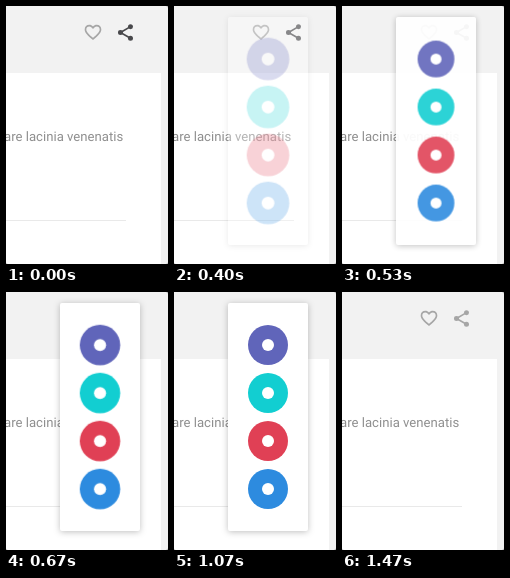
Write an HTML page that moves like this. It is 162 by 258 pixels and loops after 2.27 s.

```html
<!DOCTYPE html>
<html lang="en">
<head>
<meta charset="utf-8">
<title>Share menu</title>
<style>
  html, body { margin: 0; width: 100%; height: 100%; overflow: hidden; background: #a5a5a5; }
  svg { display: block; width: 100vw; height: 100vh; }
  text {
    font: 13.15px Roboto, sans-serif;
    fill: #8f8f8f;
    text-anchor: end;
    text-rendering: geometricPrecision;
  }

  .heart { fill: #a6a6a6; }
  .share { animation: press 2270ms step-end infinite; }
  .panel {
    fill: #fff;
    filter: drop-shadow(0 1px 3px rgba(0, 0, 0, .25));
    animation: panel 2270ms linear infinite;
  }
  .buttons { animation: buttons 2270ms linear infinite; }
  .button {
    transform-box: fill-box;
    transform-origin: center;
    animation: bounce 2270ms cubic-bezier(.215, .61, .355, 1) infinite;
  }
  .mark { fill: #fff; }

  @keyframes press {
    0% { fill: #48484b; }
    64.757%, 100% { fill: #a6a6a6; }
  }
  @keyframes panel {
    0% { opacity: 0; }
    12.335% { opacity: 0; animation-timing-function: ease-in-out; }
    25.33%, 64.75% { opacity: 1; }
    64.757%, 100% { opacity: 0; }
  }
  @keyframes buttons {
    0% { opacity: 0; }
    13.216% { opacity: 0; animation-timing-function: ease-in-out; }
    26.43%, 64.75% { opacity: 1; }
    64.757%, 100% { opacity: 0; }
  }
  @keyframes bounce {
    0%, 13.216% { transform: scale(.3); }
    19.824% { transform: scale(1.1); }
    26.43% { transform: scale(.9); }
    33.04% { transform: scale(1.03); }
    39.65% { transform: scale(.97); }
    46.26%, 100% { transform: scale(1); }
  }
</style>
</head>
<body>
<svg viewBox="0 0 162 258">
  <path fill="#f2f2f2" d="M0 0H159.5Q162 0 162 2.5V255.5Q162 258 159.5 258H2.5Q0 258 0 255.5Z"/>
  <path fill="#fff" d="M0 67H155V258H2.5Q0 258 0 255.5Z"/>
  <text x="117.2" y="135">are lacinia venenatis</text>
  <rect y="214" width="120" height="1" fill="#e9e9e9"/>

  <path class="heart" transform="translate(77 16.3) scale(.833)" d="M16.5 3c-1.74 0-3.41.81-4.5 2.09C10.91 3.81 9.24 3 7.5 3 4.42 3 2 5.42 2 8.5c0 3.78 3.4 6.86 8.55 11.54L12 21.35l1.45-1.32C18.6 15.36 22 12.28 22 8.5 22 5.42 19.58 3 16.5 3zm-4.4 15.55l-.1.1-.1-.1C7.14 14.24 4 11.39 4 8.5 4 6.5 5.5 5 7.5 5c1.54 0 3.04.99 3.57 2.36h1.87C13.46 5.99 14.96 5 16.5 5c2 0 3.5 1.5 3.5 3.5 0 2.89-3.14 5.74-7.9 10.05z"/>
  <g class="share" transform="translate(109.5 16.5) scale(.833)">
    <path d="M17.5 4.15L5.5 11.15V12.85L17.5 19.85L18.5 18.15L8 12L18.5 5.85Z"/>
    <circle cx="18" cy="5" r="3"/>
    <circle cx="6" cy="12" r="3"/>
    <circle cx="18" cy="19" r="3"/>
  </g>

  <rect class="panel" x="54" y="11" width="80" height="228" rx="2"/>
  <g class="buttons">
    <g class="button"><circle cx="94" cy="53" r="20" fill="#6065ba"/><circle class="mark" cx="94" cy="53" r="6"/></g>
    <g class="button"><circle cx="94" cy="101" r="20" fill="#12ced1"/><circle class="mark" cx="94" cy="101" r="6"/></g>
    <g class="button"><circle cx="94" cy="149" r="20" fill="#e04055"/><circle class="mark" cx="94" cy="149" r="6"/></g>
    <g class="button"><circle cx="94" cy="197" r="20" fill="#2d8bdf"/><circle class="mark" cx="94" cy="197" r="6"/></g>
  </g>
</svg>
</body>
</html>
```
